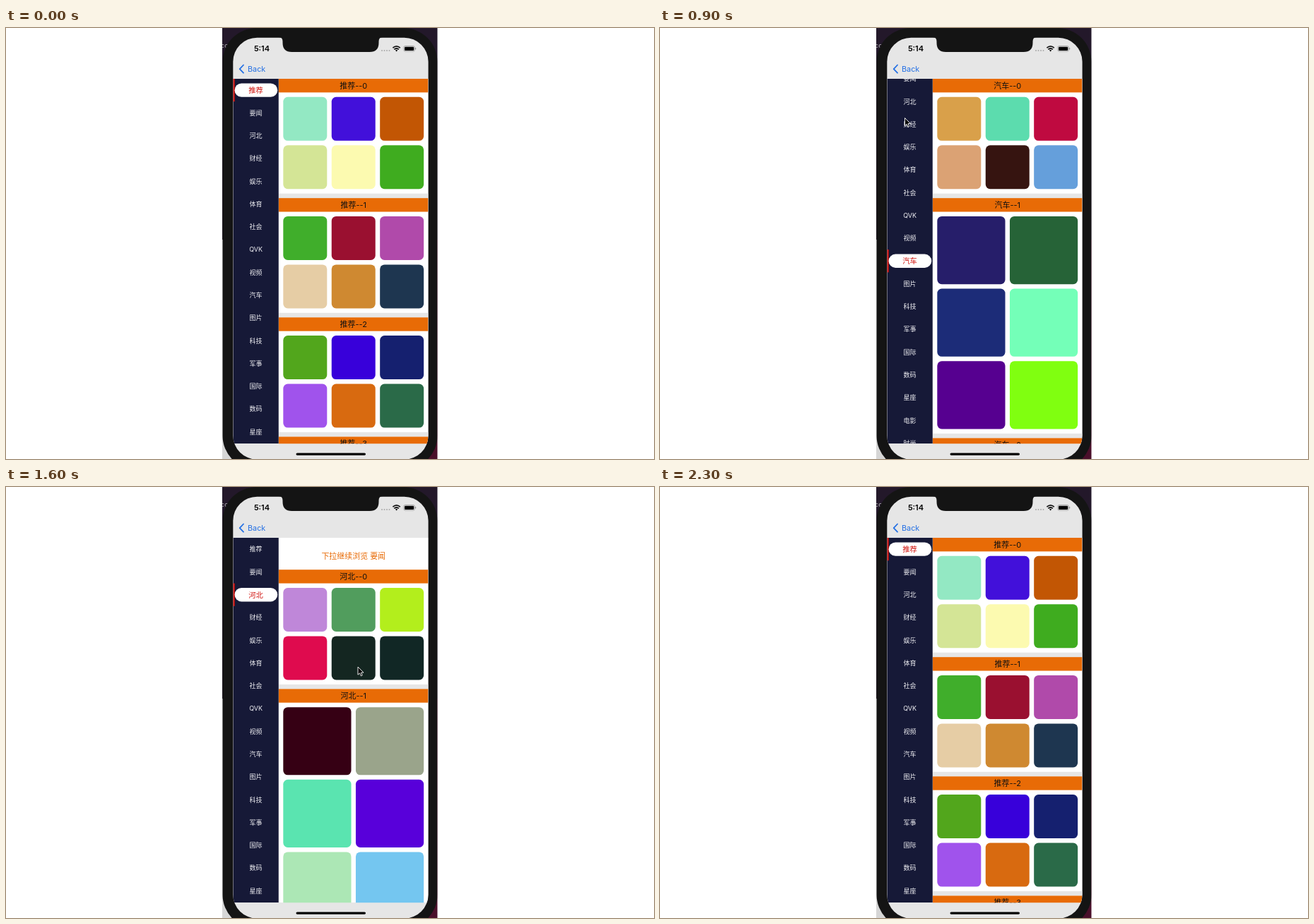
An HTML page that plays this animation: 917 by 611 pixels, repeating every 2400 ms.

```html
<!DOCTYPE html>
<html lang="zh">
<head>
<meta charset="utf-8">
<style>
html, body { margin: 0; width: 100%; height: 100%; overflow: hidden; background: #fff; }
svg { display: block; font-family: Inter, "Noto Sans CJK SC", "Noto Sans CJK", sans-serif; }
</style>
</head>
<body>
<svg width="917" height="611" viewBox="0 0 917 611">
  <defs>
    <clipPath id="device"><rect x="306" width="304.5" height="611"/></clipPath>
    <clipPath id="screen"><rect x="321.3" y="13.7" width="276.3" height="598" rx="34"/></clipPath>
    <clipPath id="side"><rect width="100" height="801"/></clipPath>
    <clipPath id="main"><rect x="100" width="328" height="801"/></clipPath>
  </defs>
  <g clip-path="url(#device)">
    <rect x="306" width="305" height="300" fill="#23182a"/>
    <rect x="306" y="300" width="150" height="311" fill="#d6d6d6"/>
    <rect x="456" y="300" width="155" height="311" fill="#4a0f2a"/>
    <text x="304" y="28" font-size="9" fill="#bbb">cc</text>
    <rect x="306.5" y="0" width="304" height="626" rx="48" fill="#141414"/>
  </g>
  <g clip-path="url(#screen)">
    <rect x="321" y="13" width="277" height="598" fill="#e6e6e6"/>
    <g id="app" transform="translate(321.3 72) scale(.6456)"></g>
  </g>
  <path d="M386 13q5.500 0 5.500 6v2q0 13 13 13h110q13 0 13-13v-2q0-6 5.500-6z" fill="#141414"/>
  <text x="362" y="33" font-size="11" font-weight="600" text-anchor="middle">5:14</text>
  <g fill="#aaa">
    <circle cx="532" cy="32" r="1"/><circle cx="535.500" cy="32" r="1"/>
    <circle cx="539" cy="32" r="1"/><circle cx="542.500" cy="32" r="1"/>
  </g>
  <g fill="none" stroke="#111" stroke-width="1.700">
    <path d="M547.400 28.200q5.200-4.600 10.400 0M549.300 30.400q3.300-2.800 6.600 0"/>
  </g>
  <path d="M552.600 33.400l-1.700-1.900q1.700-1.200 3.400 0z"/>
  <rect x="562.800" y="25.500" width="15.600" height="7.600" rx="2.200" fill="none" stroke="#888" stroke-width=".7"/>
  <rect x="564" y="26.700" width="13.200" height="5.200" rx="1.200"/>
  <rect x="579.200" y="28" width="1" height="2.600" rx=".5" fill="#888"/>
  <path d="M336 52.500l-5.300 5.600 5.300 5.600" fill="none" stroke="#2470e4" stroke-width="1.800" stroke-linecap="round" stroke-linejoin="round"/>
  <text x="342" y="62" font-size="10.800" fill="#2470e4">Back</text>
  <rect x="410.500" y="602.500" width="98.500" height="3.200" rx="1.600"/>
  <path id="cursor" d="M0 0v11.200l2.600-2.400 1.700 4 1.900-.8-1.700-3.900h3.500z" fill="#000" stroke="#fff" stroke-width=".9"/>
</svg>
<script>
const STEP = 100, STEPS = 24;
const names = "推荐 要闻 河北 财经 娱乐 体育 社会 QVK 视频 汽车 图片 科技 军事 国际 数码 星座 电影 时尚".split(" ");

// Each section: column count, then its cell colours.
const pages = {
  0: ["3 93e8c3 4210da c25604 d4e596 fcfab0 3fac1f",
      "3 40ae2b 9a1030 b04aaa e6cda5 cf8931 1e3650",
      "3 52a61c 3800da 15206f a053ec d86a10 2a6a48"],
  1: ["2 89e2a4 b90a0f dcfa3c 2b001b c00048 d0508c",
      "2 da772e 586dfa 520a34 b84c0c"],
  2: ["3 bf87d9 519d5d b3ee1c df0b4e 142621 112725",
      "2 360014 9aa48b 5ae4b0 5800da ace7b5 74c6f0"],
  3: ["2 b400f0 5bd556 b01ba8 95c722 87c428 b0b866",
      "2 2a2458 54a077 4ecf50 d8003e"],
  9: ["3 d9a04a 5cdcae bf0a40 dba274 361410 659fdb",
      "2 261e6a 266337 1c2c78 74ffb8 560090 80ff10"]
};

// [step, page]
const visits = [[0, 0], [3, 3], [7, 9], [10, 3], [13, 2], [17, 1], [21, 0]];
// [step, x, y]
const track = [[2, 350, 150], [3, 354, 186], [4, 357, 228], [6, 353, 376], [7, 353, 376],
  [9, 346.5, 127.5], [11, 483.5, 215.5], [12, 487, 255], [14, 491, 267], [15, 494, 215],
  [16, 498, 255], [18, 504.5, 201.5], [19, 505, 215], [20, 508, 255], [21, 508, 255]];

const app = document.getElementById("app");
const cursor = document.getElementById("cursor");

const rect = (x, y, w, h, fill, r = 0) =>
  `<rect x="${x}" y="${y}" width="${w}" height="${h}" rx="${r}" fill="${fill}"/>`;
const label = (text, x, y, size, fill, weight = 400) =>
  `<text x="${x}" y="${y + size * .37}" font-size="${size}" font-weight="${weight}" fill="${fill}" text-anchor="middle">${text}</text>`;

function sidebar(page) {
  const scroll = Math.max(0, page * 50 + 25 - 400);
  let out = rect(0, 0, 100, 801, "#161937");
  names.forEach((name, i) => {
    const y = i * 50 - scroll;
    if (i === page) {
      out += rect(0, y, 3.6, 50, "#e0140c") + rect(3.5, y + 10, 94, 30, "#fff", 15)
        + label(name, 50, y + 25, 16, "#d0140f", 500);
    } else out += label(name, 50, y + 25, 14, "#f0f0f4");
  });
  return out;
}

function content(page, pull) {
  let out = rect(100, 0, 328, 801, "#fff"), y = pull;
  const header = i => rect(100, y, 328, 30, "#e86b06")
    + label(`${names[page]}--${i}`, 264, y + 15.5, 17, "#111");
  if (pull) out += label("下拉继续浏览 " + names[page - 1], 264, y - 30, 17, "#e86b06", 500);
  pages[page].forEach((section, i) => {
    const [cols, ...colors] = section.split(" ");
    const size = cols > 2 ? 96 : 149, pitch = size + 10;
    out += header(i);
    colors.forEach((c, k) => {
      out += rect(110 + k % cols * pitch, y + 40 + Math.floor(k / cols) * pitch, size, size, "#" + c, 10);
    });
    y += 40 + 6 / cols * pitch;
    out += rect(100, y, 328, 10, "#e6e6e6");
    y += 10;
  });
  return out + header(pages[page].length);
}

function moveCursor(n) {
  const k = track.findIndex(p => p[0] >= n);
  const shown = n >= track[0][0] && k >= 0;
  cursor.style.display = shown ? "" : "none";
  if (!shown) return;
  const b = track[k], a = track[Math.max(0, k - 1)];
  const f = b === a ? 1 : (n - a[0]) / (b[0] - a[0]);
  const at = i => a[i] + (b[i] - a[i]) * f;
  cursor.setAttribute("transform", `translate(${at(1)} ${at(2)})`);
}

function draw(n) {
  const page = visits.filter(v => v[0] <= n).pop()[1];
  // Three drags, four steps apart, each going back one page.
  const pull = n >= 11 && n < 21 ? [26.5, 70, 0, 0][(n - 11) % 4] : 0;
  app.innerHTML = `<g clip-path="url(#main)">${content(page, pull)}</g><g clip-path="url(#side)">${sidebar(page)}</g>`;
  moveCursor(n);
}

const start = performance.now();
let last = -1;
function tick() {
  const n = Math.floor((performance.now() - start) / STEP) % STEPS;
  if (n !== last) draw(last = n);
  requestAnimationFrame(tick);
}
tick();
</script>
</body>
</html>
```
